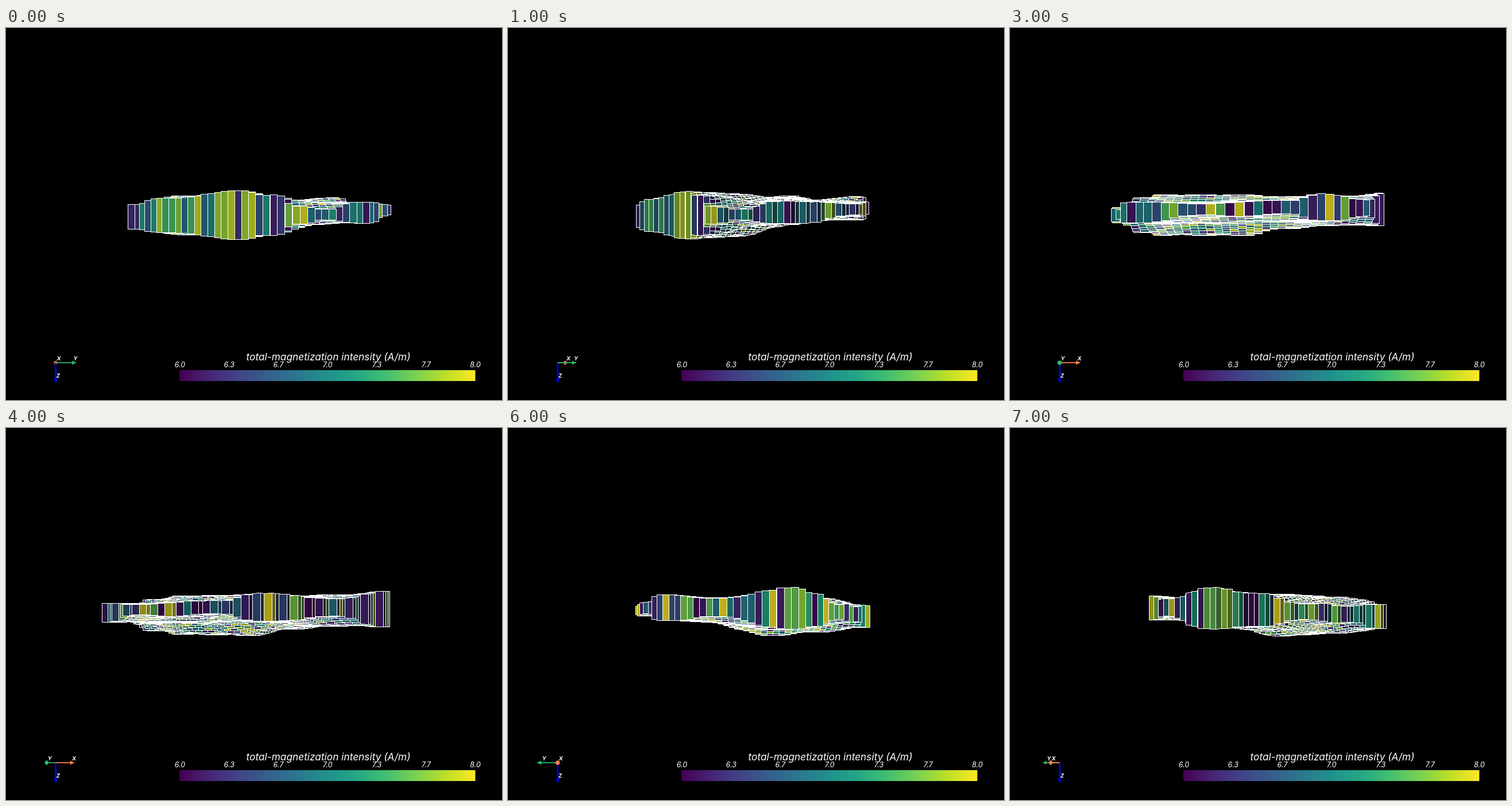
Animation, 864 px wide and 648 px high, one loop 8 s. Source, as an HTML page:

```html
<!DOCTYPE html>
<html lang="en">
<head>
<meta charset="utf-8">
<title>Total-magnetization intensity</title>
<style>
html, body { margin: 0; width: 100%; height: 100%; overflow: hidden; background: #000; }
svg { display: block; }
text { fill: #fff; font-family: Inter, "Open Sans", sans-serif; font-style: italic; font-feature-settings: "cv11"; text-anchor: middle; }
#body { stroke: #fff; stroke-width: 1; stroke-linejoin: round; shape-rendering: crispEdges; }
.axis { font-size: 9.5px; font-weight: 700; }
</style>
</head>
<body>
<svg width="864" height="648" viewBox="0 0 864 648">
  <defs><linearGradient id="ramp"></linearGradient></defs>
  <rect width="864" height="648"/>
  <g id="body"></g>
  <g id="axes"></g>
  <rect x="302" y="596" width="515.5" height="19" fill="url(#ramp)"/>
  <g id="legend"></g>
</svg>
<script>
const STEP = 1000, COUNT = 8, TURN = Math.PI / 6;
const DIST = 1209, CX = 432, CY = 324;   // camera distance, screen centre
const DX = 13.6, DY = 10.4;              // prism size
const VIRIDIS = ['440154', '482475', '414487', '355f8d', '2a788e', '21918c',
  '22a884', '44bf70', '7ad151', 'bddf26', 'fde725'];

// Key points of the sheet: x, y, top, bottom (z points down).
const RIM = [
  [-238, 62, -11, 14], [-224, 100, -7, 8], [-197, 162, -18, 13], [-80, 222, -15, 1],
  [40, 190, -20, -1], [107, 150, -31, 10], [177, 63, -24, 3], [228, -58, -38, 21],
  [170, -90, -31, 18], [86, -132, -16, 8], [10, -174, -13, 13], [-65, -206, -16, 24],
  [-130, -132, -25, 29], [-173, -26, -35, 38], [-200, 20, -28, 31]
];
const INNER = [
  [-100, -30, -35, 38], [-30, -30, -35, 38], [50, -40, -32, 26], [135, -40, -33, 20],
  [-80, -110, -30, 33], [-100, 75, -18, 14], [20, 75, -20, 11], [-30, 150, -17, 3]
];
const KEYS = [...RIM, ...INNER];

const $ = id => document.getElementById(id);

function add(parent, tag, attrs, text) {
  const el = document.createElementNS('http://www.w3.org/2000/svg', tag);
  for (const k in attrs) el.setAttribute(k, attrs[k]);
  if (text) el.textContent = text;
  parent.appendChild(el);
}

function random(seed) {
  return () => (seed = (seed * 16807) % 2147483647) / 2147483647;
}

function viridis(v) {
  const i = Math.min(9, Math.floor(v * 10)), f = v * 10 - i;
  const [a, b] = [VIRIDIS[i], VIRIDIS[i + 1]].map(h => parseInt(h, 16));
  return [16, 8, 0].map(k => (a >> k & 255) * (1 - f) + (b >> k & 255) * f);
}

function inside(x, y) {
  return RIM.reduce((hit, [ax, ay], i) => {
    const [bx, by] = RIM[(i + 1) % RIM.length];
    const cross = (ay > y) !== (by > y) && x < ax + (bx - ax) * (y - ay) / (by - ay);
    return cross ? !hit : hit;
  }, false);
}

// Inverse-distance mean of the key depths.
function depths(x, y) {
  let sum = 0, top = 0, bottom = 0;
  for (const [kx, ky, t, b] of KEYS) {
    const w = 1 / (Math.hypot(x - kx, y - ky) ** 3 + 1);
    sum += w;
    top += w * t;
    bottom += w * b;
  }
  return [top / sum, bottom / sum];
}

function makePrisms() {
  const rnd = random(4099), list = [];
  for (let x = -238 + DX / 2; x < 230; x += DX) {
    for (let y = -206 + DY / 2; y < 224; y += DY) {
      const color = viridis(rnd());
      if (!inside(x, y)) continue;
      const [top, bottom] = depths(x, y);
      list.push({x, y, top, bottom, color});
    }
  }
  return list;
}

function drawBody(angle) {
  const c = Math.cos(angle), s = Math.sin(angle);
  const eye = [-c * DIST, s * DIST];
  const far = p => Math.hypot(p.x - eye[0], p.y - eye[1]);
  const project = (x, y, z) => {
    const zoom = DIST / (DIST + x * c - y * s);
    return [CX + (x * s + y * c) * zoom, CY + z * zoom].map(v => Math.round(v) + 0.5).join(' ');
  };
  const face = (p, ax, ay, bx, by, facing) => {
    const light = 0.76 * Math.min(1, facing) ** 0.8;
    const fill = p.color.map(v => Math.round(v * light));
    const pts = [project(ax, ay, p.top), project(bx, by, p.top),
      project(bx, by, p.bottom), project(ax, ay, p.bottom)];
    return `<path fill="rgb(${fill})" d="M${pts.join('L')}Z"/>`;
  };
  let out = '';
  for (const p of [...prisms].sort((a, b) => far(b) - far(a))) {
    const dx = eye[0] - p.x, dy = eye[1] - p.y, d = far(p);
    const x = p.x + Math.sign(dx) * DX / 2, y = p.y + Math.sign(dy) * DY / 2;
    if (Math.abs(dx) > DX / 2) out += face(p, x, p.y - DY / 2, x, p.y + DY / 2, Math.abs(dx) / d);
    if (Math.abs(dy) > DY / 2) out += face(p, p.x - DX / 2, y, p.x + DX / 2, y, Math.abs(dy) / d);
  }
  $('body').innerHTML = out;
}

function arrow(g, {dx, dy, near, color}) {
  const x = 86.5, y = 583, zoom = 1 / (1 - near * 0.1), r = 3.4 * zoom;
  const at = k => [x + dx * k * zoom, y + dy * k * zoom];
  const [bx, by] = at(28.5), [tx, ty] = at(36.5);
  add(g, 'line', {x1: x, y1: y, x2: bx, y2: by, stroke: color, 'stroke-width': dy ? 3 : 1.8});
  add(g, 'ellipse', {cx: bx, cy: by, rx: dy ? r : r * near * near, ry: dy ? 0.5 : r, fill: color});
  add(g, 'polygon', {fill: color, points: `${tx},${ty} ${bx - dy * r},${by - dx * r} ${bx + dy * r},${by + dx * r}`});
}

function drawAxes(angle) {
  const g = $('axes'), c = Math.cos(angle), s = Math.sin(angle);
  g.replaceChildren();
  const parts = [
    {name: 'X', color: '#ff7f50', dx: s, dy: 0, near: -c},
    {name: 'Y', color: '#2fb871', dx: c, dy: 0, near: s},
    {name: 'Z', color: '#0000dc', dx: 0, dy: 1, near: 0}
  ].sort((a, b) => a.near - b.near);
  for (const p of parts) arrow(g, p);
  for (const p of parts) {
    const x = p.dy ? 91 : 92 + p.dx * 29 / (1 - p.near * 0.1);
    add(g, 'text', {class: 'axis', x, y: p.dy ? 608.5 : 579}, p.name);
  }
}

VIRIDIS.forEach((c, i) => add($('ramp'), 'stop', {offset: i / 10, 'stop-color': '#' + c}));
add($('legend'), 'text', {x: 561.5, y: 579, 'font-size': 17.3}, 'total-magnetization intensity (A/m)');
for (let i = 0; i <= 6; i++) {
  add($('legend'), 'text', {x: 303 + i * 85.75, y: 591, 'font-size': 12.6}, (6 + i / 3).toFixed(1));
}

const prisms = makePrisms();
const start = performance.now();
let shown = -1;

function show(time) {
  const i = Math.floor(time / STEP) % COUNT;
  if (i === shown) return;
  shown = i;
  drawBody(i * TURN);
  drawAxes(i * TURN);
}

function tick() {
  show(performance.now() - start);
  requestAnimationFrame(tick);
}
tick();
</script>
</body>
</html>
```
